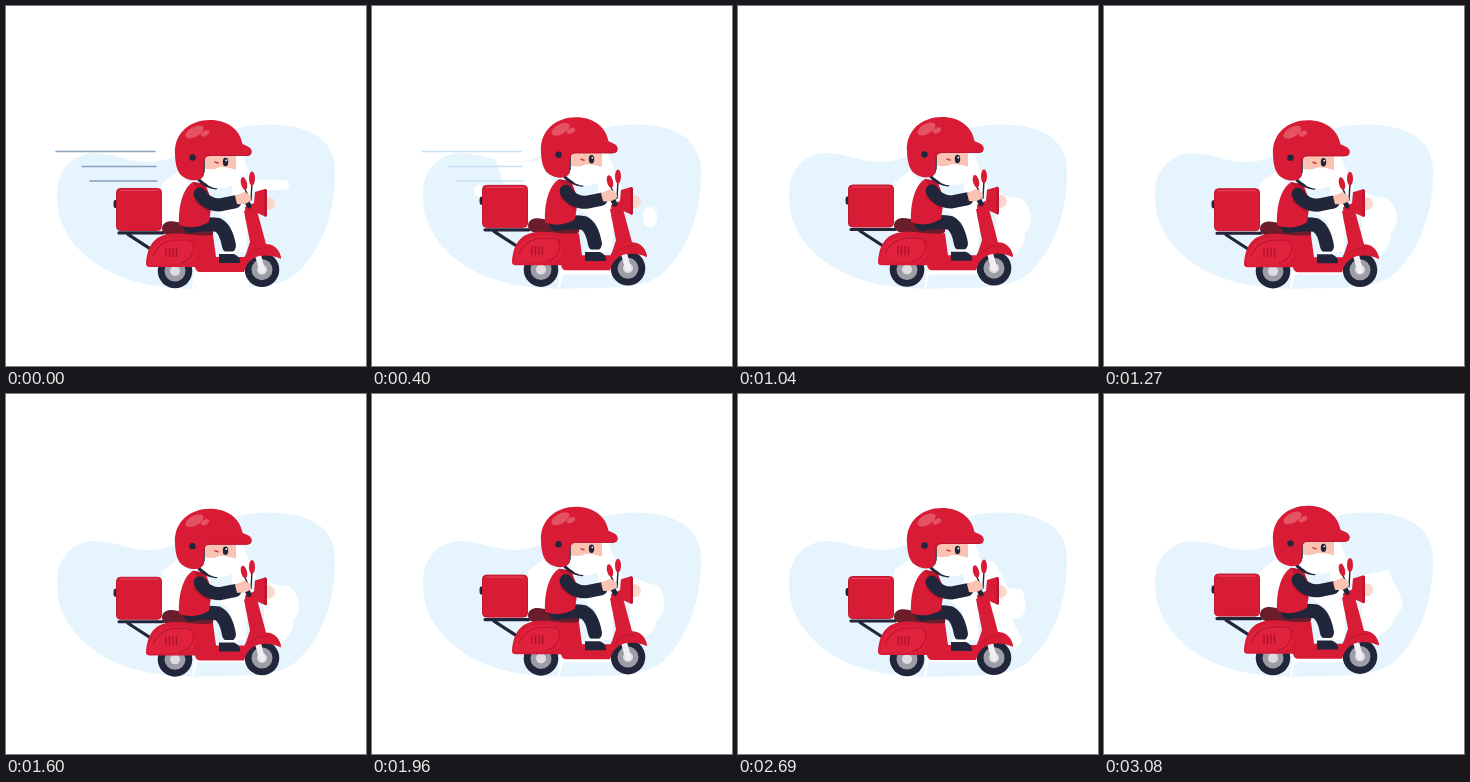
An HTML page that plays this animation: 360x360 px, repeating every 3.13 s.

```html
<!DOCTYPE html>
<html lang="en">
<head>
<meta charset="utf-8">
<title>Scooter courier</title>
<style>
  html, body { margin: 0; width: 100%; height: 100%; overflow: hidden; background: #fff; }
  svg { display: block; width: 100vw; height: 100vh; }
  .red { fill: #d91c36; }
  .deep { fill: #bd152e; }
  .navy { fill: #22263a; }
  .skin { fill: #fbc3b3; }
  .white { fill: #fff; }
  .line { fill: none; stroke: #22263a; stroke-linecap: round; stroke-linejoin: round; }
</style>
</head>
<body>
<svg viewBox="0 0 360 360">
  <path fill="#e6f4fe" d="M51 190C50 165 66 148 88 147C112 148 124 157 146 156C180 154 200 124 250 119C290 116 328 126 329 163C330 205 316 245 290 268C272 282 250 282 190 282.500C150 283 108 275 80 250C62 234 51 215 51 190Z"/>

  <g id="puffs" class="white">
    <path d="M240 174H277Q283 174 283 179T277 184H240ZM188 268H243V283H192Q187 283 188 268Z"/>
    <path d="M271 211C271 204 274 201 278 201S285 204 285 211S282 221 278 221S271 218 271 211ZM112 178Q102 178 102 185T112 192ZM122 150Q146 160 172 152V184H156Q156 178 148 178H132Z"/>
    <path d="M258 184L268 190L284 193Q293 200 293 213Q293 222 287 226Q288 236 283 241L275 252L258 240Z"/>
    <path d="M258 182L270 187L286 192Q292 198 292 210Q292 222 284 227Q284 238 274 243L258 240Z"/>
    <path d="M244 166L256 168L263 180L270 194L283 195Q288 202 287 213Q287 222 281 224L274 225L280 238L284 246L277 256L258 238Z"/>
    <path d="M258 182L270 179L284 176L290 188L296 200L299 213L292 222L286 234L274 242L258 240Z"/>
  </g>
  <path class="white" d="M200 198L242 196L240 246H228L224 216ZM156 177L172 165L184 178L176 218H156ZM226 148H236L243 166L250 182L240 200H226ZM188 264H241V268.500H191L188 282H186Z"/>

  <g id="streaks" stroke-width="1.3" stroke-linecap="round">
    <path d="M50 145.5H149M76 160.5H150M84 175H151"/>
  </g>

  <g id="wheels">
    <g id="rear">
      <circle class="navy" cx="169" cy="265" r="17.3"/>
      <circle cx="169" cy="265" r="10.5" fill="#9c9da6"/>
      <circle cx="169" cy="265" r="5" fill="#dedce0"/>
    </g>
    <use href="#rear" x="87" y="-1.300"/>
  </g>

  <g id="rack">
    <path class="line" stroke-width="3.2" d="M113 227H157M122 228.500L149 246"/>
    <path class="navy" d="M110 194H109Q107.500 194 107.500 198T109 202H110Z"/>
    <rect class="red" x="110.500" y="182.500" width="45" height="42" rx="4" stroke="#c3182f"/>
    <path fill="none" stroke="#e54a5c" d="M114 184.500H152"/>
  </g>

  <g id="seat">
    <path fill="#6c1d2b" d="M156 223C156 216 163 214 171 216L203 220Q208 222 207 229Q203 234 192 233L166 230Q156 229 156 223Z"/>
  </g>

  <g id="scooter">
    <path class="red" d="M140 258C141 242 147 230 163 228C176 226 190 231 207 229L210 251H239L244 236L238 205L250 201L260 238C268 238 274 244 275 252C267 249 259 248 250 251C243 254 240 259 238 266H194Q190 266 189 261H144Q140 261 140 258Z"/>
    <path fill="#e0223c" d="M142 259C142 244 150 234 165 232H181Q190 234 189 248Q188 257 178 258L150 259Z"/>
    <path fill="none" stroke="#bd152e" stroke-width="1.200" d="M147 250C151 240 158 235 169 234H182Q190 236 187 246Q184 256 174 257"/>
    <path fill="none" stroke="#a91329" stroke-width="1.3" d="M160 242V251M163.500 242V251M167 242V251M170.500 242V251"/>
    <path fill="none" stroke="#f0f0f4" stroke-width="6" stroke-linecap="round" d="M252 249L256 264"/>
    <path class="red" d="M238 252C244 239 259 236 268 241Q274 245 275 253Q260 246 247 252L238 260Z"/>
    <path fill="none" stroke="#bd152e" d="M243 250Q250 240 263 242"/>
  </g>

  <g id="bars">
    <circle cx="262.500" cy="197.500" r="6.500" fill="#fbd8cc"/>
    <path class="line" stroke-width="1.4" d="M238 181L244 194M246 177L245 194"/>
    <ellipse class="red" cx="238" cy="177.500" rx="3" ry="6.500" transform="rotate(-14 238 177.500)"/>
    <ellipse class="red" cx="246" cy="172.500" rx="3" ry="7"/>
    <path class="red" d="M239 201L248 197L249 186L259 183Q261 183 261 186V208Q261 212 258 210L249 206V216H240Z"/>
    <path class="deep" d="M258.500 183L259 183Q261 183 261 186V208Q261 212 258.500 210Z"/>
    <path class="line" stroke-width="5" d="M241 196L243 200"/>
  </g>

  <g id="leg">
    <path class="line" stroke-width="14" d="M184 220Q202 217 212 219Q220 223 223 240"/>
    <path class="white" d="M214 245.500H231V248H214Z"/>
    <path class="navy" d="M213 248H228Q235 251 234 257H213Z"/>
  </g>

  <g id="rider">
    <path class="red" d="M187 176C177 182 172 200 173 219Q188 225 203 216L206 196L199 178Z"/>
    <path class="deep" d="M187 176L191 183L188 195L203 207L206 196L199 178Z"/>
    <path class="line" stroke-width="13" d="M194 188Q200 199 214 199L229 196"/>
    <path class="skin" d="M229 190L238 186Q245 188 245 194Q241 199 231 198Z"/>
    <path class="line" stroke-width="3" d="M193 174Q200 181 210 182"/>
    <path class="skin" d="M196 147H230V168Q226 177 212 177L196 170Z"/>
    <path class="white" d="M197 162Q207 165 214 161Q222 161 231 164Q232 176 225 180Q213 185 203 180Q198 176 194 171Z"/>
    <path class="line" stroke-width="1.500" d="M198 152V166L193 174"/>
    <ellipse class="navy" cx="219.500" cy="156" rx="2.700" ry="4.200"/>
    <circle class="white" cx="220.300" cy="154.500" r=".9"/>
    <path fill="none" stroke="#cf3b42" stroke-width="1.500" stroke-linecap="round" d="M209 156L212 157"/>
    <path class="red" d="M169 149C167.500 127 184 114 204 114C222 114 234 124 236.500 138L243 141C248 145 246 150 240 150H204C199 150 198 153 198 160V169C196 175 186 176 179 172C171 168 169.500 159 169 149Z"/>
    <path fill="none" stroke="#bd152e" d="M245 148Q243 149.500 240 149.500H204C198 149.500 197.500 153 197.500 160V168"/>
    <ellipse cx="188.500" cy="126" rx="10" ry="5" fill="#e55262" transform="rotate(-28 188.500 126)"/>
    <ellipse cx="199" cy="127.500" rx="4.500" ry="2.500" fill="#e55262" transform="rotate(-28 199 127.500)"/>
    <circle class="navy" cx="186.500" cy="151.500" r="3.200"/>
  </g>
</svg>
<script>
  const LOOP = 3130, SHAKE = 158.2, PHASE = 0.15, REST = 0.18;
  const byId = id => document.getElementById(id);
  const lift = { wheels: 2, scooter: 2.4, bars: 2.8, leg: 2.8, seat: 4.2, rack: 4.5, rider: 3.9 };
  const puffStarts = [0, 200, 1030, 1700, 2130, 2700];
  const puffEnds = [200, 600, 1700, 2130, 2700, LOOP];
  const puffs = [...byId('puffs').children];
  const streaks = byId('streaks');
  const mix = (a, b, k) => Math.round(a + (b - a) * k);

  function draw(t) {
    const rise = (1 - Math.cos(2 * Math.PI * (t / SHAKE - PHASE))) / 2;
    for (const id in lift) {
      byId(id).setAttribute('transform', `translate(0 ${(lift[id] * (REST - rise)).toFixed(3)})`);
    }
    puffs.forEach((p, i) => {
      p.style.display = t >= puffStarts[i] && t < puffEnds[i] ? '' : 'none';
    });
    const pale = Math.min(1, t / 400);
    streaks.setAttribute('stroke', `rgb(${mix(139, 199, pale)},${mix(160, 225, pale)},${mix(188, 242, pale)})`);
    streaks.setAttribute('opacity', Math.max(0, Math.min(1, (900 - t) / 500)));
  }

  const start = performance.now();
  function tick() {
    draw((performance.now() - start) % LOOP);
    requestAnimationFrame(tick);
  }
  tick();
</script>
</body>
</html>
```
